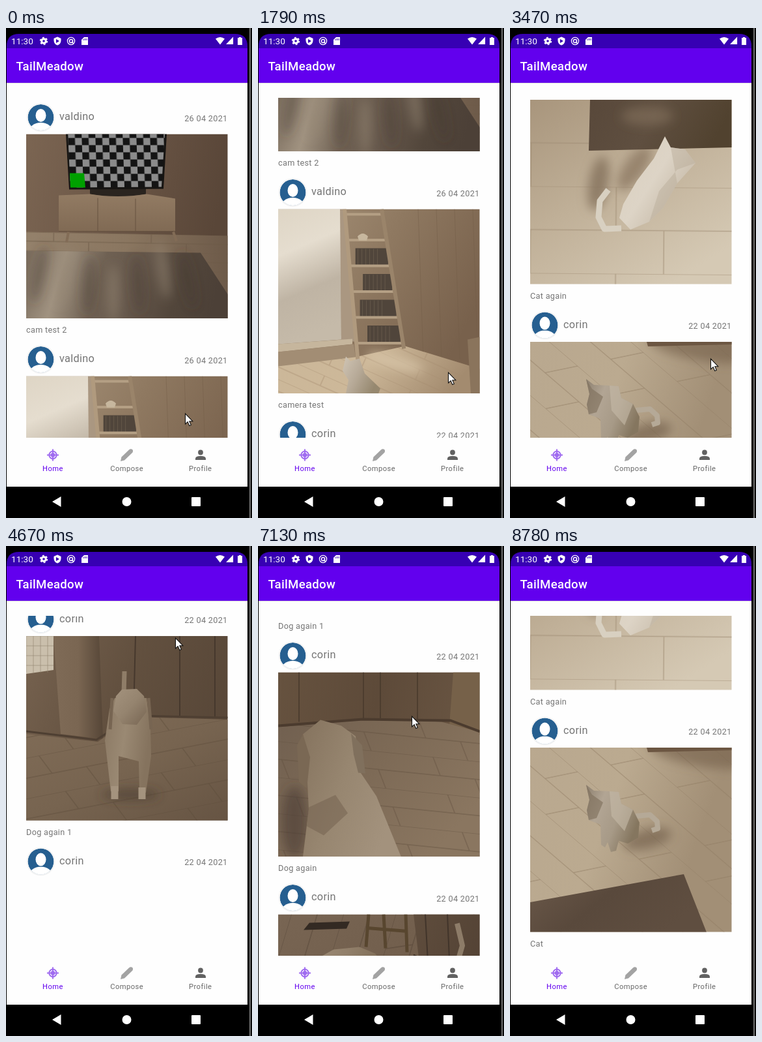
An HTML page that plays this animation: 378 by 751 pixels, repeating every 9.56 s.

```html
<!DOCTYPE html>
<html lang="en">
<head>
<meta charset="utf-8">
<title>Pet feed</title>
<style>
  html, body { margin: 0; width: 100%; height: 100%; overflow: hidden; background: #000; }
  svg { display: block; }
  text { font: 12.7px Roboto, sans-serif; letter-spacing: .3px; fill: #757575; }
  .title { font-size: 18.6px; font-weight: 500; fill: #fff; }
  .clock { font-size: 13.6px; letter-spacing: 0; fill: #fff; }
  .name { font-size: 16.3px; }
  .tab { font-size: 11.2px; letter-spacing: .45px; text-anchor: middle; fill: #666; }
  .date { text-anchor: end; }
</style>
</head>
<body>
<svg width="378" height="751" viewBox="0 0 378 751">
  <defs id="defs">
    <clipPath id="list"><path d="M23 107H348V628H23Z"/></clipPath>
    <clipPath id="frame"><path d="M0 0H309.5V282.5H0Z"/></clipPath>
    <clipPath id="disc"><circle r="20"/></clipPath>
    <filter id="blur" x="-1" y="-1" width="3" height="3"><feGaussianBlur stdDeviation="8"/></filter>
    <pattern id="checks" width="21" height="22" patternUnits="userSpaceOnUse" patternTransform="translate(64 -5) skewX(2)">
      <path d="M0 0H21V22H0Z" fill="#141414"/><path d="M0 0H10.5V11H0ZM10.5 11H21V22H10.5Z" fill="#8b8b8b"/>
    </pattern>
    <g id="avatar">
      <circle r="21" fill="#fff" stroke="#f1f1f1" stroke-width="1.5"/>
      <g clip-path="url(#disc)">
        <circle r="20" fill="#265f90"/>
        <ellipse cy="22" rx="18" ry="14" fill="#fff"/>
        <ellipse cy="-3" rx="9" ry="11" fill="#265f90"/>
        <ellipse cy="-3" rx="8" ry="10" fill="#fff"/>
      </g>
    </g>
  </defs>

  <path d="M375 0V751" stroke="#707070" stroke-width="2"/>
  <path d="M1 31V28Q1 9 20 9H352Q371 9 371 28V31Z" fill="#3700b3"/>
  <path d="M1 84H371V703H1Z" fill="#fefefe"/>
  <path d="M1 84H371V85H1Z" fill="#ddd"/>
  <path d="M1 31H371V84H1Z" fill="#6200ee"/>
  <text class="clock" x="8" y="25">11:30</text>
  <text class="title" x="15.5" y="65">TailMeadow</text>

  <g fill="none" stroke="#fff">
    <circle cx="58" cy="20" r="3.3" stroke-width="3"/>
    <circle cx="58" cy="20" r="5.4" stroke-width="1.7" stroke-dasharray="2.8 2.855"/>
    <circle cx="100" cy="20" r="5.6" stroke-width="1.3"/>
    <circle cx="100" cy="20" r="2.6" stroke-width="1.5"/>
    <path d="M101 21L104 24" stroke-width="1.5"/>
    <path d="M339.5 24.5H348.5V15Z" stroke-width="1.2"/>
  </g>
  <g fill="#fff">
    <path d="M79 13.5L84.5 16V19.5Q84 25 79 26.5 74 25 73.5 19.5V16Z"/>
    <path d="M77 17V23L82 20Z" fill="#3700b3"/>
    <path d="M120 14H126V26H116V18Z"/>
    <path d="M119 17V19M121.5 16V19M124 16V19" stroke="#3700b3"/>
    <path d="M322 16.5Q329 11.5 336 16.5L329 25.5Z"/>
    <path d="M343 21L348.5 15V24.5H340Z"/>
    <path d="M356 15H358V14H361V15H363V26H356Z"/>
    <path d="M71 726L84.5 718V734Z"/>
    <circle cx="185.5" cy="726" r="7"/>
    <rect x="285" y="719" width="14" height="14" rx="1"/>
  </g>

  <g clip-path="url(#list)">
    <g id="feed"></g>
    <path id="glow" d="M23 628V623Q195 565 348 611V628Z" fill="#6200ee"/>
  </g>

  <g fill="none" stroke="#a06cf0">
    <circle cx="72" cy="654.5" r="5.7" stroke-width="2"/>
    <path d="M72 645.5V663.5M63 654.5H81" stroke-width="2"/>
    <circle cx="72" cy="654.5" r="3" fill="#a06cf0"/>
  </g>
  <path d="M176 664L177.5 657.5 189 646.5Q192 644 194.5 646.5 196 649 193.5 651.5L182 662.5Z" fill="#a3a3a3"/>
  <g fill="#616161">
    <circle cx="299" cy="650.5" r="3.9"/>
    <path d="M291 662V660Q291 656 299 656 307 656 307 660V662Z"/>
  </g>
  <text class="tab" x="72" y="679" style="fill:#6200ee">Home</text>
  <text class="tab" x="185.7" y="679">Compose</text>
  <text class="tab" x="298.7" y="679">Profile</text>

  <path id="cursor" d="M0 0V16L3.7 12.6 6.2 18.5 8.8 17.4 6.3 11.7H11.3Z" fill="#fff" stroke="#111" stroke-width="1.1"/>
</svg>

<script>
const $ = id => document.getElementById(id);
const range = (n, make) => Array.from({ length: n }, (_, i) => make(i)).join("");
const random = i => Math.abs(Math.sin(i * 127.1 + 3) * 43758.5) % 1;

// Scene helpers: shapes, blurred patches, gradients and plank floors.
let paints = 0;
function define(tag, attributes, content) {
  const id = "paint" + paints++;
  $("defs").insertAdjacentHTML("beforeend", `<${tag} id="${id}" ${attributes}>${content}</${tag}>`);
  return `url(#${id})`;
}
const area = (fill, d) => `<path d="M${d}Z" fill="${fill}"/>`;
const line = (stroke, width, d) =>
  `<path d="M${d}" fill="none" stroke="${stroke}" stroke-width="${width}" stroke-linejoin="round"/>`;
const patch = (fill, x, y, rx, ry, angle = 0) =>
  `<ellipse rx="${rx}" ry="${ry}" fill="${fill}" filter="url(#blur)" transform="translate(${x} ${y}) rotate(${angle})"/>`;
// The direction (x, y) is relative to the shape's own box.
const blend = (x, y, ...colors) => define("linearGradient", `x2="${x}" y2="${y}"`,
  colors.map((c, i) => `<stop offset="${i / (colors.length - 1)}" stop-color="${c}"/>`).join(""));
const backdrop = (...args) => area(blend(...args), "0 0H310V283H0");
function planks(color, length, width, transform, d = "0 0H310V283H0") {
  const seams = line(color, 1.6, `0 0H${length}M0 ${width}H${length}M${length * .3} 0V${width}M${length * .66} ${width}V${2 * width}`);
  return area(define("pattern", `width="${length}" height="${2 * width}" patternUnits="userSpaceOnUse" patternTransform="${transform}"`, seams), d);
}

function tvRoom() {
  const carpet = "0 179L268 182 310 246V283H0";
  return backdrop(1, .2, "#7b6552", "#6b5646", "#594638")
    + area(blend(1, 0, "#94816b", "#8a7660", "#6d5a49"), "0 150L310 156V283H0")
    + planks("#6b584688", 150, 14, "rotate(1) translate(0 10)", "0 150L310 156V283H0")
    + area("#2a241f", "98 83H184V92Q140 100 98 92")
    + area("#171513", "61 0H216L211 84 66 85")
    + area("url(#checks)", "64 0H213L208 81 68 82")
    + area("#00a000", "67 60H89L91 82H68")
    + area(blend(0, 1, "#927b63", "#806a54"), "50 94L98 92Q140 99 185 92L229 99V149H50")
    + line("#665240", 1, "110 98V149M168 99V149M50 149H229")
    + line("#826c56", 4, "65 150L62 166M226 150L231 164")
    + area(blend(1, .1, "#786a5b", "#a09280", "#6f6153", "#64564a", "#52463b", "#4c4037"), carpet)
    + range(7, i => patch(i % 2 ? "#94867388" : "#473a3066", 20 + i * 38, 205 + 50 * random(i), 9, 45, 12 - i * 4));
}

function bookcase() {
  const left = y => 102 + y * .088, right = y => 159 + y * .16;
  const floor = "0 241L118 227 195 210 310 245V283H0";
  return backdrop(1, .5, "#a8947b", "#8f7961", "#78614c")
    + range(4, i => line("#725c4877", 1, `${215 + i * 28} 0l8 230`))
    + area(blend(.2, 1, "#ded5c5", "#e5ddcf", "#bfb4a4", "#c5baa9"), "0 0H96L97 200 0 207")
    + area("#aa9781", "95 0H104L118 203H97")
    + area("#c6b69d", "0 207L114 199V207L0 219")
    + area("#a28d74", "0 219L116 207 119 228 0 242")
    + area(blend(1, .2, "#cbb799", "#cdb899", "#a38b6f"), floor)
    + planks("#a48c7077", 130, 17, "rotate(24)", floor)
    + patch("#d6c3a6", 180, 235, 45, 8, 15)
    + range(6, i => {
      const y = 8 + i * 39.5, x = left(y) + 9 + 8 * (i % 2), end = right(y) - 4;
      const books = area("#50453b", `${x} ${y - 27}H${end}V${y}H${x}`)
        + range(6, k => line("#73665699", 1, `${x + 4 + k * 6} ${y - 26}v26`));
      return (i > 1 ? books : "") + line("#b49f84", 4, `${left(y)} ${y}H${right(y)}`);
    })
    + area("#c7b79e", "122 42Q130 33 138 42L136 48H124")
    + line("#b09a7e", 6, `${left(0)} 0L${left(231)} 231`)
    + line("#9a846a", 6, `${right(0)} 0L${right(214)} 214`)
    + area("#8a745c", "291 200L310 196V283H296")
    + area(blend(1, .5, "#d0c5b5", "#b7aa98", "#96886f"), "104 226L111 233 125 229 133 252 157 275 154 283H104L108 262 99 248");
}

function catAbove() {
  return backdrop(.7, 1, "#a8957c", "#c0b098", "#d5c9b4")
    + planks("#9f8c7399", 205, 66.5, "translate(72 0) rotate(.5)")
    + patch("#84705acc", 105, 128, 15, 42, 10)
    + patch("#84705aaa", 160, 105, 16, 40, 35)
    + area(blend(1, .2, "#58483a", "#5f4f40", "#51422f"), "92 0H310V73L90 78")
    + patch("#85735e99", 180, 25, 40, 14)
    + line("#d8d0c1", 9, "140 197L114 198 105 180 107 155 120 138")
    + area(blend(1, .8, "#d9cfbe", "#ddd4c6", "#bdb09c"), "207 56L216 73 238 76 254 97 226 128 204 166 183 187 154 199 137 181 143 160 164 124 190 90")
    + area("#b9ac9877", "216 73L238 76 254 97 226 107 198 140 183 187 204 166 226 128");
}

function catSide() {
  return backdrop(.9, .3, "#b9a88f", "#bbaa90", "#a28f76")
    + planks("#8e7a6288", 190, 52, "matrix(.76 .65 -.97 .2 30 0)")
    + patch("#735e4a99", 270, 5, 90, 25, 8)
    + patch("#6d594699", 180, 140, 38, 15, -15)
    + area("#6c5642", "179 0H310V4L181 7")
    + line("#b5a997", 8, "162 105L184 103 195 113 196 124 187 127")
    + area(blend(1, .5, "#8d806f", "#b2a594", "#a79a87", "#85765f"), "86 57L98 66 122 67 136 68 140 86 158 95 168 115 166 138 150 147 136 143 132 158 124 160 119 145 115 153 109 149 108 118 90 111 87 96 91 80")
    + area("#82735faa", "86 57L95 72 112 84 102 108 90 111 87 96 91 80")
    + area("#c6bba999", "122 67L136 68 140 86 158 95 145 128 125 105")
    + area(blend(1, .4, "#6b594a", "#59493c", "#5f4e40"), "0 237L236 194 271 283H0");
}

function dogFront() {
  const floor = "0 150L110 162 165 124 310 128V283H0";
  return backdrop(1, .4, "#776350", "#62503f", "#584738")
    + line("#46382d", 2, "168 0L165 120M236 0V122M290 0V124")
    + area("#cabfac", "0 0H42V52L0 58")
    + range(4, i => line("#91847199", 1, `${i * 11} 0v56M0 ${i * 15}h42`))
    + area(blend(1, 0, "#7f6b57", "#7a6652", "#564637"), "42 0H112L118 158 53 150")
    + area(blend(1, 1, "#806c57", "#776450", "#665443"), floor)
    + planks("#59483877", 150, 34, "matrix(.98 -.19 .6 .8 0 0)", floor)
    + line("#4e3f32", 3, "0 146L108 159 165 122 310 125")
    + patch("#47392d99", 160, 243, 45, 8)
    + line("#8f7d68", 7, "151 54L150 88")
    + area(blend(1, .3, "#8a7863", "#9a8973", "#85735e"), "136 95H185L191 140 192 184 184 240H174L173 192 142 184V238H130L121 160 128 112")
    + area(blend(1, 1, "#a4937e", "#95846f", "#776552"), "138 92L147 82 170 81 181 92 185 116 170 136 148 135 134 115")
    + line("#776552", 5, "132 95L129 143M188 95L192 143")
    + line("#a4937e", 11, "136 230V250M178 232V250");
}

function dogBack() {
  const floor = "0 84L130 73H240L310 92V283H0";
  return backdrop(1, .2, "#66523f", "#5d4a39", "#6a5643")
    + line("#47382b", 1.5, "32 0V76M131 0V74M157 0V74M214 0V73")
    + area("#766149", "269 0H310V96L263 82")
    + area(blend(1, .6, "#716050", "#7d6a56", "#8a7660"), floor)
    + planks("#5f4e3d77", 150, 32, "matrix(.99 .1 .35 .9 0 -5)", floor)
    + line("#4b3b2e", 4, "0 82L130 72 265 74 310 91")
    + patch("#47392d88", 25, 230, 20, 55)
    + area(blend(1, .5, "#85735e", "#978670", "#a3927d"), "38 95L65 73 97 82 119 98 124 150 151 190 189 283H38L47 210 44 150")
    + area("#7563508c", "47 207L88 188 107 216 70 250 44 236")
    + area("#7a6854", "38 95L29 112 32 168 44 178 49 130")
    + area("#80705d", "112 94L129 112 134 155 123 154 116 126");
}

function dogSide() {
  return backdrop(.8, 1, "#786553", "#715e4c", "#625141")
    + planks("#4f403388", 260, 42, "matrix(-.3 1 1 -.15 20 0)")
    + area(blend(1, .5, "#5f4d3d", "#544335"), "208 0H310V120L216 66")
    + line("#41342a", 2, "226 0L230 73M260 0L264 92M208 62L310 111")
    + area("#332a23", "48 13L110 11 105 22 39 24")
    + line("#58462f", 5, "139 0L135 50M162 0L165 52M196 0L198 58M137 21L199 26")
    + patch("#42352a99", 210, 210, 65, 20, -20)
    + line("#8d7c68", 8, "256 94L276 72 283 48 275 14")
    + area(blend(1, .4, "#98876f", "#8d7b66", "#7d6b57"), "145 76L200 96 252 97 270 88 284 110 292 145 278 184H270L276 152 250 128 226 158 187 170 178 208 168 264 158 266 160 200 146 180 132 233 122 232 138 165")
    + area(blend(1, .4, "#a08f79", "#917f6a", "#78664f"), "35 94L49 74 85 54 125 50 149 60 166 82 164 130 149 149 132 140 90 127 54 116 38 106")
    + line("#a19079", 10, "132 225L126 238M165 255L157 270M278 175L275 187");
}

const posts = [
  ["valdino", "26 04 2021", "cam test 2", tvRoom],
  ["valdino", "26 04 2021", "camera test", bookcase],
  ["corin", "22 04 2021", "Cat again", catAbove],
  ["corin", "22 04 2021", "Cat", catSide],
  ["corin", "22 04 2021", "Dog again 1", dogFront],
  ["corin", "22 04 2021", "Dog again", dogBack],
  ["corin", "22 04 2021", "My dog", dogSide],
];
$("feed").innerHTML = posts.map(([name, date, caption, scene], i) => `
  <g transform="translate(31 ${162.5 + 371 * i})">
    <use href="#avatar" x="22.5" y="-25.5"/>
    <text class="name" x="51" y="-21.5">${name}</text>
    <text class="date" x="309.5" y="-20">${date}</text>
    <g id="photo${i}" clip-path="url(#frame)">${scene()}</g>
    <text y="304.5">${caption}</text>
  </g>`).join("");

const LOOP = 9560, FIRST = 530, STEP = 137, LAST = 60;

// Drags: step, scroll offset, pointer x, pointer y
const drags = [
  [-1, 0, 275.5, 591], [9, 256, 292.5, 528], [21, 794.5, 308.5, 507], [30, 1508.5, 260.5, 141],
  [37, 2076, 217.5, 135], [48, 1824, 236.5, 261], [LAST, 966.5, 303, 680],
];

function draw(elapsed) {
  // The screen refreshes in steps, then rests until the loop ends.
  const step = Math.max(-1, Math.min(LAST, Math.floor((elapsed % LOOP - FIRST) / STEP)));
  const next = Math.max(1, drags.findIndex(drag => drag[0] >= step));
  const from = drags[next - 1], to = drags[next];
  const p = (step - from[0]) / (to[0] - from[0]);
  const [, scroll, x, y] = from.map((value, i) => value + (to[i] - value) * p);
  const dip = 58 * Math.sin(Math.PI * p);
  const glow = Math.max(0, 1 - Math.abs(step - 37) / 4);

  $("feed").setAttribute("transform", `translate(0 ${-scroll})`);
  $("cursor").setAttribute("transform", `translate(${x} ${y + dip})`);
  $("cursor").style.display = step < LAST ? "" : "none";
  $("photo5").style.display = step > 30 ? "" : "none"; // still loading
  $("glow").setAttribute("transform", `translate(0 ${628 * (1 - glow)}) scale(1 ${glow})`);
  $("glow").setAttribute("opacity", .14 * glow);
}

const start = performance.now();
(function loop() {
  draw(performance.now() - start);
  requestAnimationFrame(loop);
})();
</script>
</body>
</html>
```
